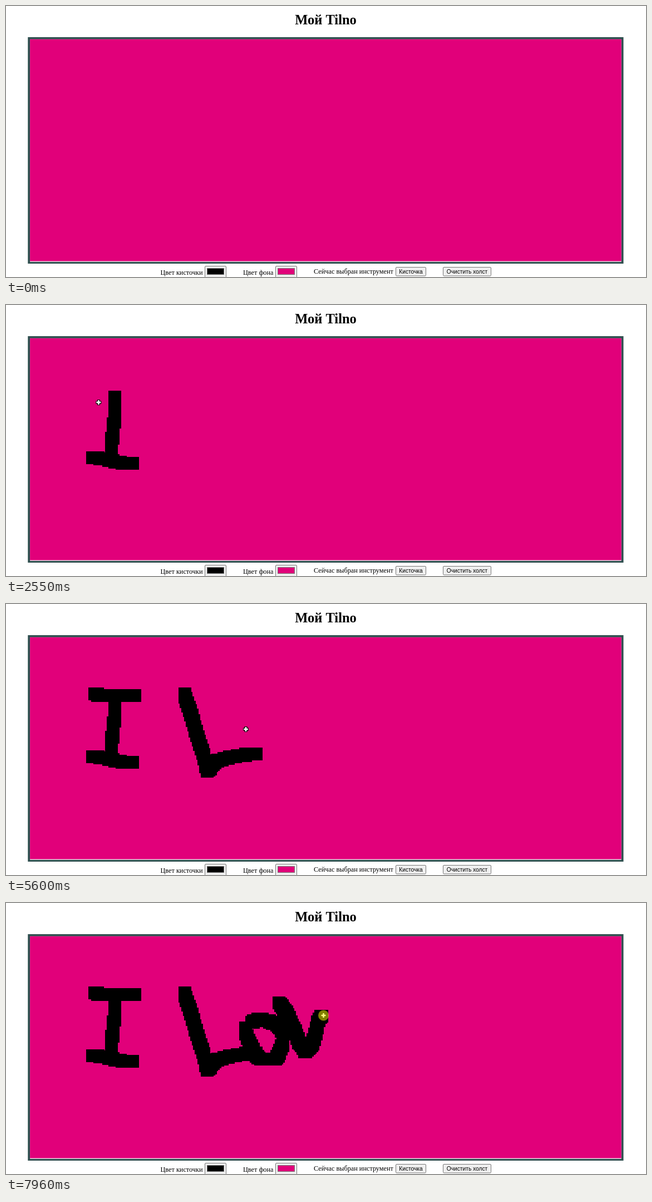
Write an HTML page that moves like this. It is 1150x487 px and loops after 8 s.

```html
<!DOCTYPE html>
<html lang="ru">
<head>
<meta charset="utf-8">
<style>
  html, body { margin: 0; width: 100%; height: 100%; overflow: hidden; background: #fff; }
  svg { display: block; }
  .title { font: bold 24.5px "Liberation Serif", serif; text-anchor: middle; }
  .label { font: 12.25px "Liberation Serif", serif; }
  .caption { font: 10.2px "Liberation Sans", sans-serif; text-anchor: middle; }
  .button { fill: #efefef; stroke: #767676; }
  .swatch { stroke: #777; }
</style>
</head>
<body>
<svg width="1150" height="487" viewBox="0 0 1150 487">
  <text class="title" x="574.5" y="33">Мой Tilno</text>
  <rect x="39.3" y="56" width="1070.2" height="407" fill="#2f4f4f"/>
  <rect x="43.1" y="59.8" width="1062.6" height="400" fill="#fff"/>
  <rect x="43.1" y="59.8" width="1062.6" height="398.8" fill="#e1007a"/>

  <text class="label" x="277.5" y="483">Цвет кисточки</text>
  <rect class="button" x="357.5" y="467.5" width="38" height="21" rx="1.5"/>
  <rect class="swatch" x="361.5" y="471.5" width="30" height="11" fill="#000"/>
  <text class="label" x="426" y="483">Цвет фона</text>
  <rect class="button" x="484.5" y="467.5" width="38" height="21" rx="1.5"/>
  <rect class="swatch" x="488.5" y="471.5" width="30" height="11" fill="#e1007a"/>
  <text class="label" x="553" y="481">Сейчас выбран инструмент</text>
  <rect class="button" x="700.5" y="469.5" width="54" height="15.5" rx="1.5"/>
  <text class="caption" x="727.5" y="481">Кисточка</text>
  <rect class="button" x="785.5" y="469.5" width="86" height="15.5" rx="1.5"/>
  <text class="caption" x="828.5" y="481">Очистить холст</text>

  <path id="ink" shape-rendering="crispEdges"/>
  <g id="cursor">
    <path d="M-5 0H5M0-5V5" stroke="#000" stroke-width="5"/>
    <path d="M-4 0H4M0-4V4" stroke="#fff" stroke-width="2.6"/>
    <circle id="press" r="9.5" fill="#ff0" fill-opacity=".5"/>
  </g>
</svg>
<script>
const LOOP = 8000, STEP = 70, BRUSH = 23.4, SPACING = 1.5, CELL = 2.66;
const ANCHORS = [480, 1310, 2200, 4290, 4770, 5600, 7260];
const [ink, cursor, press] = ['ink', 'cursor', 'press'].map(id => document.getElementById(id));

// Pointer arrives, presses, stops moving and releases; power shapes the slowdown.
const stroke = (arrive, down, stop, up, power, d) => {
  const path = document.createElementNS('http://www.w3.org/2000/svg', 'path');
  path.setAttribute('d', d);
  const length = path.getTotalLength();
  const distance = t => length * (1 - (1 - Math.min(1, Math.max(0, (t - down) / (stop - down)))) ** power);
  return { arrive, down, up, distance, at: s => path.getPointAtLength(s) };
};
const strokes = [
  stroke(480, 480, 1030, 1100, 1, 'M195.5 165.5V200L193 223 190 255V266'),
  stroke(1480, 1655, 2060, 2150, 1, 'M155.5 274.5L170 276 190 280 208 284 226 286'),
  stroke(2650, 2690, 3400, 3470, 2, 'M159.5 162L168 164 188 165 225 164 230.5 163.5'),
  stroke(3870, 3880, 4570, 4740, 1, 'M321.5 162V165L333 198 343.5 236 355 271 362 299'),
  stroke(4740, 4740, 5230, 5310, 1, 'M362 299H363.5L376 283 388 279.5 406 275 428 271.5 439 270H450.5'),
  stroke(5590, 5660, 6720, 6790, 1.4,
    'M431 225L432 237 440 256 447 273 457 280 468 281H485L492 268 497 255V233L489 220 473 213 454 209 441 214'),
  stroke(7130, 7250, 7960, 8000, 1.5,
    'M491 179.5L504 198 520 232 528 253 538 267H539.5L552 253 557 232 562 211 566 205 570.5 202')
];

function pointer(t) {
  if (t < 150) return { x: 621, y: 322 };
  if (t < 480) return { x: 197, y: 162 };
  const i = strokes.findLastIndex(s => t >= s.down), current = strokes[i], next = strokes[i + 1];
  const from = current.at(current.distance(t));
  if (t < current.up || !next) return from;
  const to = next.at(0), u = Math.min(1, (t - current.up) / (next.arrive - current.up));
  const k = u * u * (3 - 2 * u);
  return { x: from.x + (to.x - from.x) * k, y: from.y + (to.y - from.y) * k };
}

// The brush moves in whole cells of a coarse canvas, counted from the stroke's start.
const snap = (value, start) => Math.round(start + Math.round((value - start) / CELL) * CELL - BRUSH / 2);
const stamp = (point, start) =>
  `M${snap(point.x, start.x)} ${snap(point.y, start.y)}h${BRUSH}v${BRUSH}h-${BRUSH}z`;

function draw(now) {
  let t = now % LOOP;
  const anchor = ANCHORS.findLast(a => a <= t);
  if (anchor) t = anchor + Math.floor((t - anchor) / STEP) * STEP;

  let d = '';
  for (const s of strokes) {
    if (t < s.down) break;
    const start = s.at(0), end = s.distance(t - STEP * 0.8);
    for (let p = 0; p < end; p += SPACING) d += stamp(s.at(p), start);
    d += stamp(s.at(end), start);
  }
  ink.setAttribute('d', d);

  const { x, y } = pointer(t);
  cursor.setAttribute('transform', `translate(${x} ${y})`);
  cursor.style.display = t < 70 ? 'none' : '';
  press.style.display = strokes.some(s => t >= s.down && t < s.up) ? '' : 'none';
  requestAnimationFrame(() => draw(performance.now()));
}
draw(performance.now());
</script>
</body>
</html>
```
